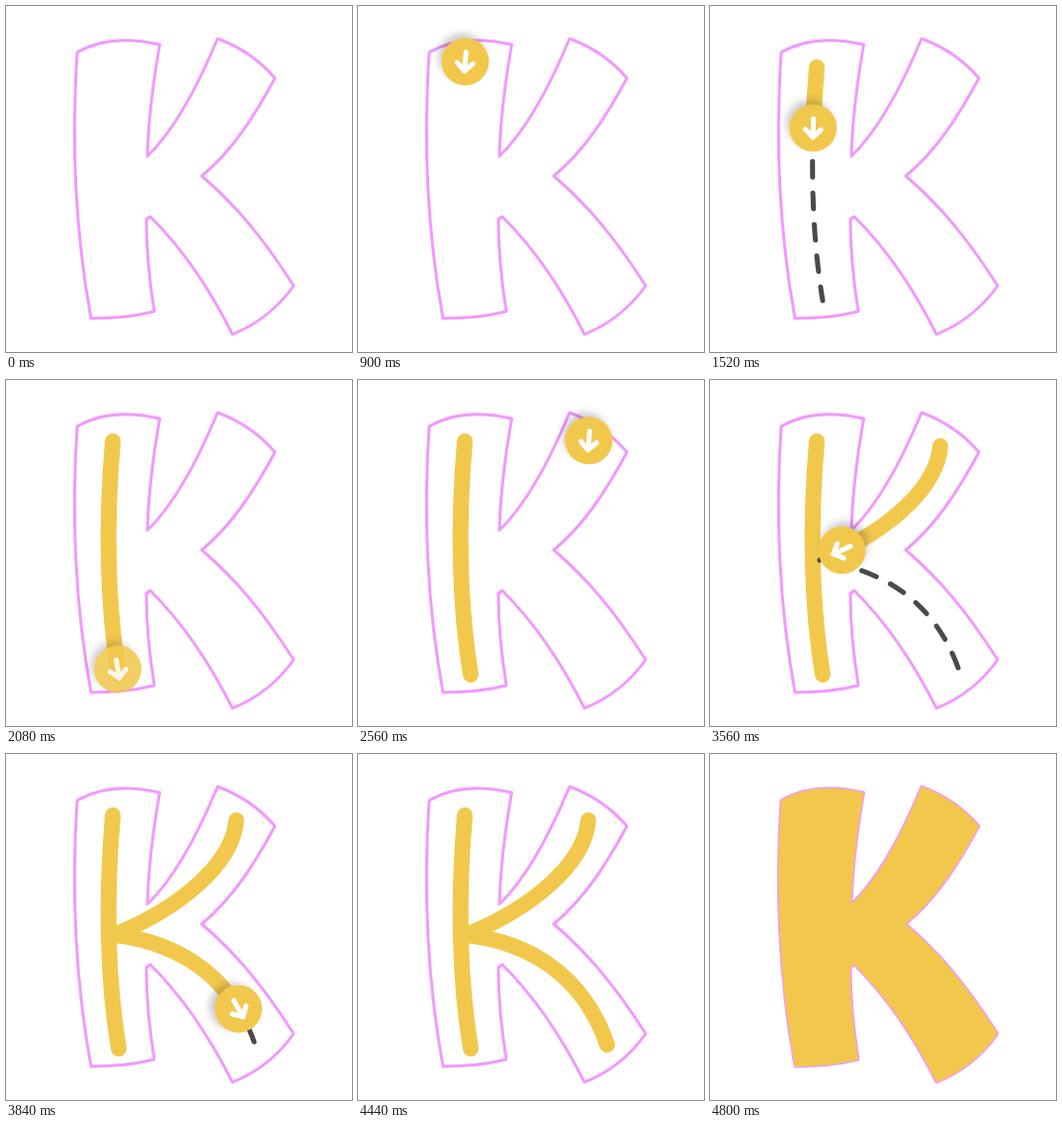
These frames come from a looping animation (350 px wide and 350 px high, 6 s). An HTML page without scripts:

```html
<!DOCTYPE html>
<html lang="en">
<head>
<meta charset="utf-8">
<title>Tracing the letter K</title>
<style>
  html, body { margin: 0; width: 100%; height: 100%; overflow: hidden; background: #fff; }
  svg { display: block; width: 100%; height: 100%; }
  .outline { fill: #fff; stroke: #f299ff; stroke-width: 3; stroke-linejoin: round; }
  .fill { fill: #f2c84c; }
  .line, .dash, .reveal { fill: none; stroke-linecap: round; }
  .line { stroke: #f2c84c; stroke-width: 16; }
  .dash { stroke: #4a4a4a; stroke-width: 5; stroke-dasharray: 16 16; }
  .reveal { stroke: #fff; stroke-width: 9; }
  .down { stroke-dasharray: 238 500; stroke-dashoffset: 245; }
  .arms { stroke-dasharray: 371 800; stroke-dashoffset: 380; }
  .arrow { fill: none; stroke: #fff; stroke-width: 5; stroke-linecap: round; stroke-linejoin: round; }
</style>
</head>
<body>
<svg viewBox="0 0 350 350">
  <defs>
    <path id="letter" d="M72 47C96 33 125 32 155.500 39C149 76 144 115 143 152C170 126 192 86 214 33C236 41 255 53 272 73C250 114 228 147 198 172C232 201 259 233 291 283C276 304 257 321 229 332C206 286 180 247 146 213L142 216C142 246 145 278 150 309C130 314 108 316 86 316C70 228 66 137 72 47Z"/>
    <path id="down" pathLength="238" d="M108 62C101.500 140 101.500 222 114 298"/>
    <path id="arms" pathLength="371" d="M233 67C229 113 172 158 109 183C173 190 228 224 252 294"/>

    <filter id="blur" x="-50%" y="-50%" width="200%" height="200%">
      <feGaussianBlur stdDeviation="4.500"/>
    </filter>

    <!-- Points along +x and trails the path point -->
    <g id="disc" transform="translate(-5.700 0)">
      <circle cx="-5" cy="4" r="23" fill="#000" opacity=".22" filter="url(#blur)"/>
      <circle r="24" class="fill"/>
      <path class="arrow" d="M-9.500 0H9.500M1.500 -8L9.500 0L1.500 8"/>
    </g>

    <mask id="showDown" maskUnits="userSpaceOnUse" x="0" y="0" width="350" height="350">
      <use href="#down" class="reveal down">
        <animate attributeName="stroke-dashoffset" dur="6s" repeatCount="indefinite" values="245;245;0;0"
          keyTimes="0;.1467;.2167;1" calcMode="spline" keySplines="0 0 1 1;.37 0 .63 1;0 0 1 1"/>
      </use>
    </mask>
    <mask id="showArms" maskUnits="userSpaceOnUse" x="0" y="0" width="350" height="350">
      <use href="#arms" class="reveal arms">
        <animate attributeName="stroke-dashoffset" dur="6s" repeatCount="indefinite" values="380;380;0;0"
          keyTimes="0;.42;.53;1" calcMode="spline" keySplines="0 0 1 1;.37 0 .63 1;0 0 1 1"/>
      </use>
    </mask>
  </defs>

  <use href="#letter" class="outline"/>

  <!-- Downstroke -->
  <g mask="url(#showDown)"><use href="#down" class="dash"/></g>
  <use href="#down" class="line down">
    <animate attributeName="stroke-dashoffset" dur="6s" repeatCount="indefinite" values="245;245;0;0"
      keyTimes="0;.22;.3133;1" calcMode="spline" keySplines="0 0 1 1;.37 0 .63 1;0 0 1 1"/>
  </use>

  <!-- Arm and leg -->
  <g mask="url(#showArms)"><use href="#arms" class="dash"/></g>
  <use href="#arms" class="line arms">
    <animate attributeName="stroke-dashoffset" dur="6s" repeatCount="indefinite" values="380;380;0;0"
      keyTimes="0;.5333;.6667;1" calcMode="spline" keySplines="0 0 1 1;.37 0 .63 1;0 0 1 1"/>
  </use>

  <!-- Guide discs -->
  <g opacity="0">
    <use href="#disc"/>
    <animate attributeName="opacity" dur="6s" repeatCount="indefinite"
      values="0;0;1;1;0;0" keyTimes="0;.0033;.0333;.3433;.37;1"/>
    <animateMotion dur="6s" repeatCount="indefinite" rotate="auto" keyPoints="0;0;1;1"
      keyTimes="0;.22;.3133;1" calcMode="spline" keySplines="0 0 1 1;.37 0 .63 1;0 0 1 1">
      <mpath href="#down"/>
    </animateMotion>
  </g>
  <g opacity="0">
    <use href="#disc"/>
    <animate attributeName="opacity" dur="6s" repeatCount="indefinite"
      values="0;0;1;1;0;0" keyTimes="0;.39;.42;.7067;.74;1"/>
    <animateMotion dur="6s" repeatCount="indefinite" rotate="auto" keyPoints="0;0;1;1"
      keyTimes="0;.5333;.6667;1" calcMode="spline" keySplines="0 0 1 1;.37 0 .63 1;0 0 1 1">
      <mpath href="#arms"/>
    </animateMotion>
  </g>

  <use href="#letter" class="fill" opacity="0">
    <animate attributeName="opacity" dur="6s" repeatCount="indefinite"
      values="0;0;1;1" keyTimes="0;.7733;.8;1"/>
  </use>
</svg>
</body>
</html>
```
